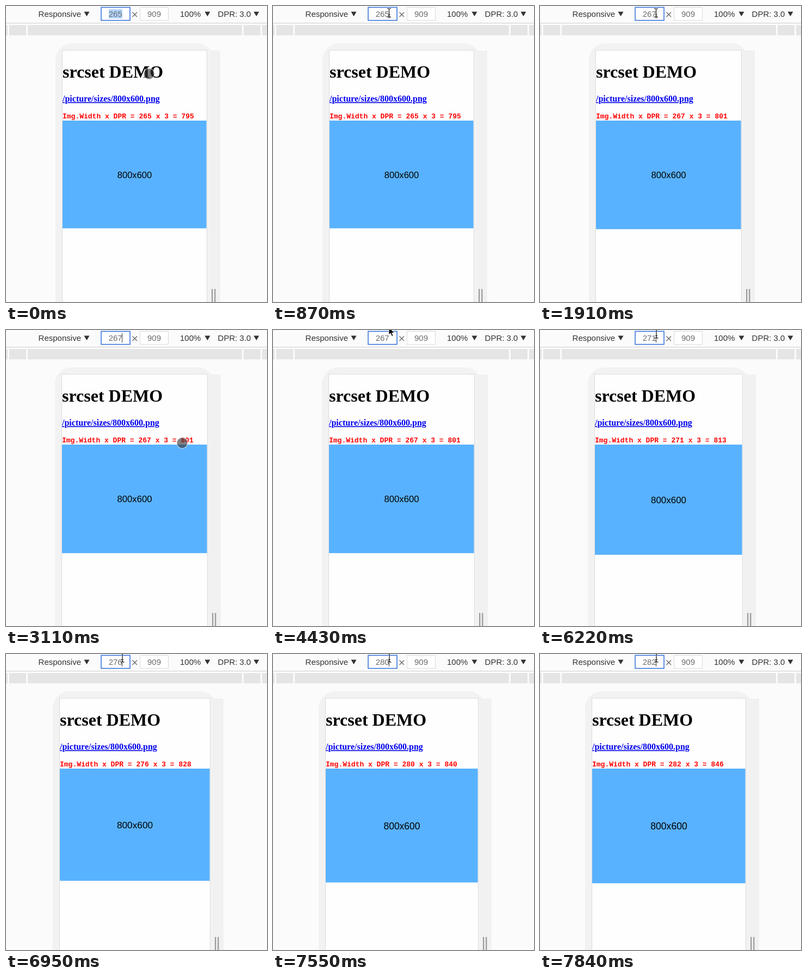
Recreate the animation shown at these times as an HTML page. Size 480 px wide and 545 px high, loop 8000 ms.

```html
<!DOCTYPE html>
<html lang="en">
<head>
<meta charset="utf-8">
<title>srcset demo</title>
<style>
  html, body { margin: 0; width: 100%; height: 100%; overflow: hidden; background: #fbfbfb; }
  svg { display: block; width: 480px; height: 545px; }
  .ui { font: 15px "Liberation Sans", Arial, sans-serif; fill: #333; }
  .num { fill: #6c6c6c; text-anchor: middle; }
  .serif { font-family: "Liberation Serif", Times, serif; font-weight: bold; }
  .mono { font: bold 13px "Liberation Mono", Courier, monospace; fill: #f00; white-space: pre; }
  .label { font-family: "Liberation Sans", Arial, sans-serif; text-anchor: middle; }
</style>
</head>
<body>
<svg viewBox="0 0 480 545">
  <rect width="480" height="545" fill="#fbfbfb"/>

  <!-- media query ruler -->
  <g fill="#e5e5e5">
    <rect y="35" width="3" height="19"/>
    <rect x="6" y="35" width="31" height="19"/>
    <rect x="40" y="35" width="394" height="19"/>
    <rect x="437" y="35" width="31" height="19"/>
    <rect x="471" y="35" width="9" height="19"/>
  </g>

  <!-- device -->
  <g id="device">
    <rect id="bezel" x="-13" y="69" height="520" rx="30" fill="#f2f2f2"/>
    <g id="grip">
      <rect x="6" y="82" width="19" height="463" fill="#f1f1f1"/>
      <path d="M10.2 521V545M15.3 521V545" stroke="#999" stroke-width="2.2"/>
    </g>
    <rect id="screen" x="-.5" y="81.5" height="500" fill="#fefefe" stroke="#dcdcdc"/>
    <text class="serif" y="132" font-size="32">srcset DEMO</text>
    <text class="serif" y="176" font-size="16" fill="#00e" text-decoration="underline">/picture/sizes/800x600.png</text>
    <text id="sum" class="mono" y="207"></text>
    <rect id="image" y="211" fill="#59b2ff"/>
    <text id="label" class="label">800x600</text>
  </g>

  <!-- toolbar -->
  <rect width="480" height="31" fill="#fbfbfb"/>
  <path d="M0 31.5H480" stroke="#cdcdcd"/>
  <g class="ui">
    <text x="59.6" y="20">Responsive</text>
    <text x="320" y="20">100%</text>
    <text x="389.6" y="20">DPR: 3.0</text>
    <path d="M143.5 10.5h10l-5 8.5zM365.5 10.5h10l-5 8.5zM455.5 10.5h10l-5 8.5z"/>
    <path d="M232.5 11.5l8.5 8.5M241 11.5l-8.5 8.5" stroke="#666" stroke-width="1.3"/>
    <rect x="175" y="2.5" width="53" height="24" fill="#fff" stroke="#2f6fdb" stroke-width="1.5"/>
    <rect x="246.5" y="2.5" width="52" height="24" fill="#fff" stroke="#dadada"/>
    <rect id="selection" x="189" y="6" width="25" height="17" fill="#b3d4fd"/>
    <text id="width" class="num" x="201.2" y="20"></text>
    <text class="num" x="272.5" y="20">909</text>
    <rect id="caret" x="213" y="6" width="1" height="17" fill="#333"/>
  </g>

  <!-- pointer shapes -->
  <g id="pointer">
    <circle id="touch" r="10" fill="#333" fill-opacity=".62" stroke="#fff" stroke-opacity=".5" stroke-width="1.5"/>
    <path id="arrow" d="M0 0V14L3.2 11L5.6 16.5L8 15.5L5.7 10.3H10.2Z" fill="#000" stroke="#fff" stroke-width=".9"/>
    <g id="beam" fill="none">
      <path id="beamPath" d="M-3.5 -8Q0 -8 0 -6Q0 -8 3.5 -8M0 -6V6M-3.5 8Q0 8 0 6Q0 8 3.5 8M-2 3.5H2" stroke="#fff" stroke-width="2.4" stroke-opacity=".7"/>
      <use href="#beamPath" style="display:none"/>
      <path d="M-3.5 -8Q0 -8 0 -6Q0 -8 3.5 -8M0 -6V6M-3.5 8Q0 8 0 6Q0 8 3.5 8M-2 3.5H2" stroke="#111" stroke-width="1.2"/>
    </g>
  </g>
</svg>
<script>
const LOOP = 8000, DPR = 3, MID = 236.5;
const $ = id => document.getElementById(id);
const set = (id, attrs) => {
  for (const k in attrs) $(id).setAttribute(k, attrs[k]);
};
const show = (id, on) => set(id, { visibility: on ? 'visible' : 'hidden' });

// [time, viewport width]
const widths = [
  [0, 265], [1470, 266], [1910, 267], [5780, 268], [6070, 270], [6220, 271],
  [6520, 273], [6670, 274], [6800, 275], [6950, 276], [7250, 278],
  [7550, 280], [7690, 281], [7840, 282]
];

// [time, x, y, shape]
const moves = [
  [0, 263, 125, 'touch'], [140, 257, 107, 'touch'], [290, 242, 66, 'arrow'],
  [430, 224, 33, 'arrow'], [580, 214, 16, 'beam'], [720, 213.5, 12.5, 'beam'],
  [2360, 215, 17, 'beam'], [2510, 232, 45, 'arrow'], [2660, 290, 108, 'touch'],
  [2810, 346, 168, 'touch'], [2960, 363, 203, 'touch'], [3110, 324, 208, 'touch'],
  [3250, 321, 212, 'touch'], [3400, 320, 211, 'touch'],
  [3550, 318, 238, 'touch'], [3700, 300, 288, 'touch'], [3850, 270, 315, 'touch'],
  [4000, 241, 288, 'touch'], [4140, 221, 190, 'touch'], [4280, 213, 94, 'touch'],
  [4430, 213, -5, 'arrow'], [4580, 216, 5, 'beam'], [4730, 219, 6, 'beam'],
  [4880, 214, 7, 'beam']
];

// [time, caret visible]
const blinks = [
  [0, 0], [720, 1], [2360, 0], [2810, 1], [3400, 0], [3850, 1],
  [4280, 0], [4880, 1], [5330, 0], [5780, 1]
];

const at = (steps, t) => steps.findLast(s => s[0] <= t);

function draw(t) {
  const w = at(widths, t)[1];
  const h = w * 0.75, size = w / 16;
  const left = Math.round(MID - w / 2);

  set('device', { transform: `translate(${left} 0)` });
  set('bezel', { width: w + 26 });
  set('grip', { transform: `translate(${w} 0)` });
  set('screen', { width: w + 1 });
  set('image', { width: w - 0.4, height: h - 0.4 });
  set('label', { x: w / 2, y: 211.3 + h / 2 + size * 0.36, 'font-size': size });
  $('sum').textContent = `Img.Width x DPR = ${w} x ${DPR} = ${w * DPR}`;
  $('width').textContent = w;

  show('selection', t < 720);
  show('caret', at(blinks, t)[1]);

  const [, x, y, shape] = at(moves, t);
  set('pointer', { transform: `translate(${x} ${y})` });
  for (const id of ['touch', 'arrow', 'beam']) show(id, id === shape);
}

const start = performance.now();
function tick() {
  draw((performance.now() - start) % LOOP);
  requestAnimationFrame(tick);
}
tick();
</script>
</body>
</html>
```
